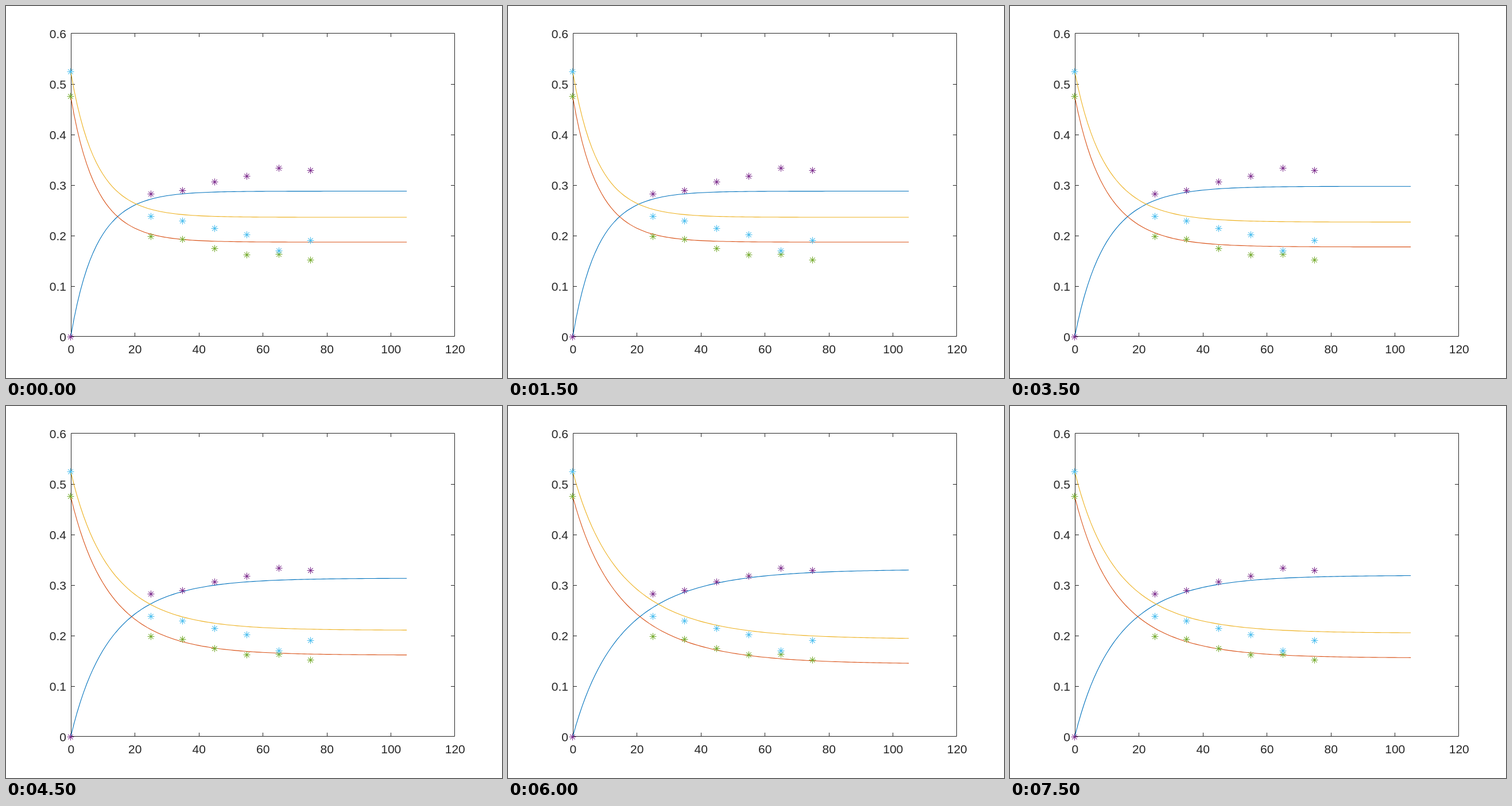
Recreate the animation shown at these times as an HTML page with a canvas. Size 864 px wide and 648 px high, loop 8 s.

```html
<!DOCTYPE html>
<html lang="en">
<head>
<meta charset="utf-8">
<title>Rate fit</title>
<style>
  html, body { margin: 0; width: 100%; height: 100%; overflow: hidden; background: #fff; }
  canvas { display: block; width: 864px; height: 648px; }
</style>
</head>
<body>
<canvas id="plot" width="864" height="648"></canvas>
<script>
const ctx = document.getElementById('plot').getContext('2d');
const BOX = { left: 113.5, right: 781.5, top: 47.5, bottom: 575.5 };
const X0 = 112.75, X_SCALE = 5.575;
const Y0 = 576.1, HEIGHT = 528;
const T_MAX = 120, T_END = 105, Y_MAX = 0.6, TICK = 6.5;
const INK = '#262626', BLUE = '#0072BD', RED = '#D95319', YELLOW = '#EDB120';
const PURPLE = '#7E2F8E', GREEN = '#77AC30', CYAN = '#4DBEEE';

// Reversible reaction A + B <-> 2C, forward rate k, net quadratic term NET
const A0 = 0.4754, B0 = 1 - A0, NET = 0.07;

// The fit searches for k: [step, k] turning points, straight in between
const STEP = 500, STEPS = 16;
const search = [[0, 0.15], [3, 0.15], [7, 0.1285], [9, 0.107],
                [10, 0.0516], [11, 0.105], [12, 0.0937], [15, 0.102]];

// Measured C and A; B follows from the balance A + B + 2C = 1
const measuredC = [0, 0.282, 0.2895, 0.306, 0.318, 0.3335, 0.3288];
const measuredA = [A0, 0.198, 0.1922, 0.1741, 0.1621, 0.163, 0.1522];
const sampleTime = i => i ? 15 + 10 * i : 0;

function rate(step) {
  const i = search.findIndex(([s]) => s >= step);
  if (i === 0) return search[0][1];
  const [s0, k0] = search[i - 1], [s1, k1] = search[i];
  return k0 + (k1 - k0) * (step - s0) / (s1 - s0);
}

function product(k, t) {
  if (t === 0) return 0;
  const start = k * A0 * B0;
  const disc = k * k - 4 * NET * start;
  const s = Math.sqrt(Math.abs(disc));
  const ratio = disc > 0 ? Math.tanh(s * t / 2) : Math.tan(s * t / 2);
  return 2 * start / (k + s / ratio);
}

const px = t => X0 + X_SCALE * t;
const cell = v => Math.floor(v) + 0.5;
const nearest = v => Math.round(v) + 0.5;

function line(x1, y1, x2, y2) {
  ctx.moveTo(x1, y1);
  ctx.lineTo(x2, y2);
}

function axes(py, low) {
  const { left, right, top, bottom } = BOX;
  ctx.strokeStyle = ctx.fillStyle = INK;
  ctx.font = '21px "Liberation Sans", Arial, sans-serif';
  ctx.beginPath();
  ctx.rect(left, top, right - left, bottom - top);
  ctx.textAlign = 'center';
  for (let t = 0; t <= T_MAX; t += 20) {
    const x = nearest(px(t));
    if (t > 0 && t < T_MAX) {
      line(x, bottom, x, bottom - TICK);
      line(x, top, x, top + TICK);
    }
    ctx.fillText(t, px(t) + 0.5, 605);
  }
  ctx.textAlign = 'right';
  for (let i = Math.round(low * 10); i <= 6; i++) {
    const v = i / 10, y = nearest(py(v));
    if (v > low && v < Y_MAX) {
      line(left, y, left + TICK, y);
      line(right, y, right - TICK, y);
    }
    ctx.fillText(i ? v.toFixed(1) : '0', 105, py(v) + 8);
  }
  ctx.stroke();
}

function curve(color, value, py) {
  ctx.strokeStyle = color;
  ctx.beginPath();
  for (let t = 0; t <= T_END; t++) ctx.lineTo(px(t), py(value(t)));
  ctx.stroke();
}

function star(color, x, y) {
  const arm = 6, diag = 4.2;
  ctx.strokeStyle = color;
  ctx.beginPath();
  line(x - arm, y, x + arm, y);
  line(x, y - arm, x, y + arm);
  line(x - diag, y - diag, x + diag, y + diag);
  line(x - diag, y + diag, x + diag, y - diag);
  ctx.stroke();
}

function draw(k) {
  const low = product(k, T_END) > A0 ? -0.1 : 0;
  const py = v => Y0 - HEIGHT * (v - low) / (Y_MAX - low);
  ctx.fillStyle = '#fff';
  ctx.fillRect(0, 0, 864, 648);
  ctx.lineWidth = 1;
  axes(py, low);
  ctx.lineWidth = 1.1;
  curve(BLUE, t => product(k, t), py);
  curve(RED, t => A0 - product(k, t), py);
  curve(YELLOW, t => B0 - product(k, t), py);
  measuredC.forEach((c, i) => {
    const a = measuredA[i], x = cell(px(sampleTime(i)));
    star(PURPLE, x, cell(py(c)));
    star(GREEN, x, cell(py(a)));
    star(CYAN, x, cell(py(1 - a - 2 * c)));
  });
}

const began = performance.now();
let shown = -1;
function tick() {
  const step = Math.floor((performance.now() - began) / STEP) % STEPS;
  if (step !== shown) draw(rate(shown = step));
  requestAnimationFrame(tick);
}
tick();
</script>
</body>
</html>
```
